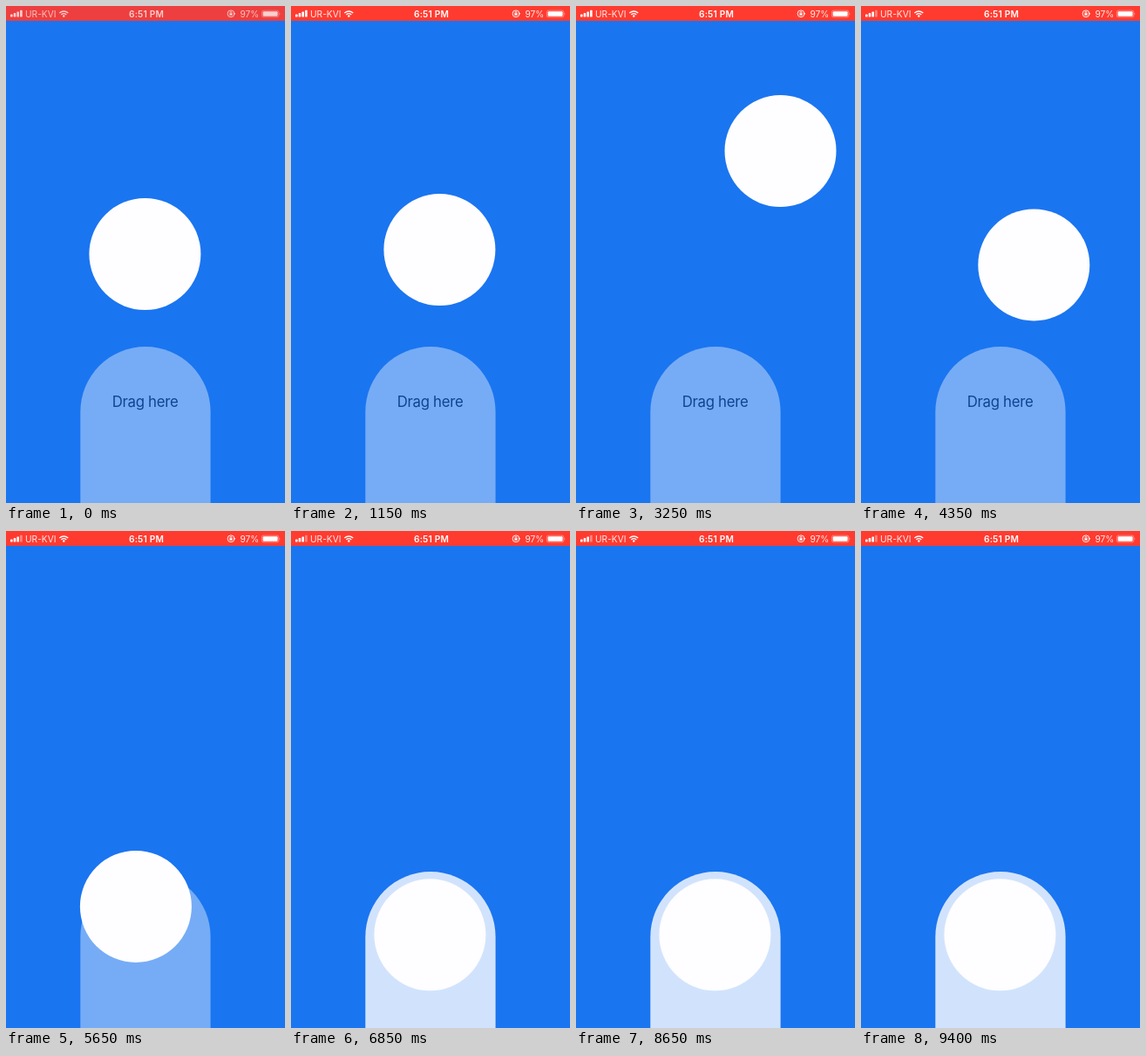
An HTML page that plays this animation: 320 by 569 pixels, repeating every 9450 ms.

```html
<!DOCTYPE html>
<html lang="en">
<head>
<meta charset="utf-8">
<title>Drag to dock</title>
<style>
  html, body { margin: 0; width: 100%; height: 100%; overflow: hidden; background: #1a75f0; }
  svg { display: block; width: 320px; height: 569px; font-family: Inter, Roboto, sans-serif; }
</style>
</head>
<body>
<svg viewBox="0 0 320 569">
  <rect id="bar" width="320" height="17" fill="#ff3b30"/>
  <g id="status" fill="#fff" font-size="10.2">
    <g id="signal"></g>
    <text x="22" y="12.6" fill-opacity=".9">UR-KVI</text>
    <g id="wifi" fill="none" stroke="#fff" stroke-width="1.3">
      <path d="M61.3 8Q66.3 4 71.3 8M63.3 9.9Q66.3 7.5 69.3 9.9"/>
      <circle cx="66.3" cy="11.6" r=".6"/>
    </g>
    <g id="lock" fill="none" stroke="#fff" stroke-width=".9">
      <circle cx="258" cy="8.8" r="3.9"/>
      <path d="M257 8.4V7.5a1 1 0 0 1 2 0V8.4"/>
      <path d="M256.4 9.5h3.2" stroke-width="2.4"/>
      <path d="M260.7 8.3h2.6l-1.3 1.8z" fill="#fff" stroke="none"/>
    </g>
    <text x="161" y="12.6" text-anchor="middle" font-weight="600" letter-spacing=".15">6:51 PM</text>
    <text x="290.3" y="12.6" text-anchor="end" fill-opacity=".9">97%</text>
    <g id="battery">
      <rect x="293.4" y="5.2" width="19.4" height="7.6" rx="1.8" fill="none" stroke="#fff" stroke-width=".8" stroke-opacity=".45"/>
      <rect x="294.6" y="6.3" width="17" height="5.4" rx="1"/>
      <path d="M313.6 7.6q1.5 1.4 0 2.8z" fill-opacity=".6"/>
    </g>
  </g>
  <path id="dock" d="M85.3 569V464.6a74.6 74.6 0 0 1 149.3 0V569z" fill="#fff"/>
  <text x="159.6" y="458.7" text-anchor="middle" font-size="16.8" letter-spacing="-.3" fill="#0f438f">Drag here</text>
  <circle id="ball" r="64" fill="#fefdff"/>
</svg>
<script>
const LOOP = 9450, STEP = 50;
const [bar, status, signal, dock, ball] =
  ['bar', 'status', 'signal', 'dock', 'ball'].map(id => document.getElementById(id));

for (let i = 0; i < 4; i++) {
  const height = 3 + 1.6 * i;
  signal.innerHTML += `<rect x="${5 + 3.7 * i}" y="${12.6 - height}" width="2.6" height="${height}" rx=".7"/>`;
}

// Each drag eases the ball to a new resting point
const home = { x: 159.4, y: 284 };
const drags = [
  { from: 350, to: 1250, x: 170.8, y: 278.9 },
  { from: 1400, to: 2000, x: 237.4, y: 155.6 },
  { from: 3150, to: 3750, x: 198.3, y: 296.4 },
  { from: 4350, to: 5050, x: 143.2, y: 412.4 },
  { from: 5350, to: 6100, x: 159.4, y: 462.3 }
];

const ease = (t, from, to) => {
  const p = Math.min(1, Math.max(0, (t - from) / (to - from)));
  return p * p * (3 - 2 * p);
};

const ballAt = t => drags.reduce((pos, drag) => {
  const p = ease(t, drag.from, drag.to);
  return { x: pos.x + (drag.x - pos.x) * p, y: pos.y + (drag.y - pos.y) * p };
}, home);

function draw(t) {
  const { x, y } = ballAt(t);
  ball.setAttribute('cx', x);
  ball.setAttribute('cy', y);
  dock.setAttribute('opacity', 0.4 + 0.4 * ease(t, 5650, 5850));
  const wake = ease(t, 0, 100);
  bar.setAttribute('opacity', 0.92 + 0.08 * wake);
  status.setAttribute('opacity', 0.75 + 0.25 * wake);
  signal.lastChild.setAttribute('opacity', t < 3400 ? 1 : 0.4);
}

const origin = performance.now();
function tick() {
  const t = (performance.now() - origin) % LOOP;
  draw(Math.floor(t / STEP) * STEP);
  requestAnimationFrame(tick);
}
tick();
</script>
</body>
</html>
```
